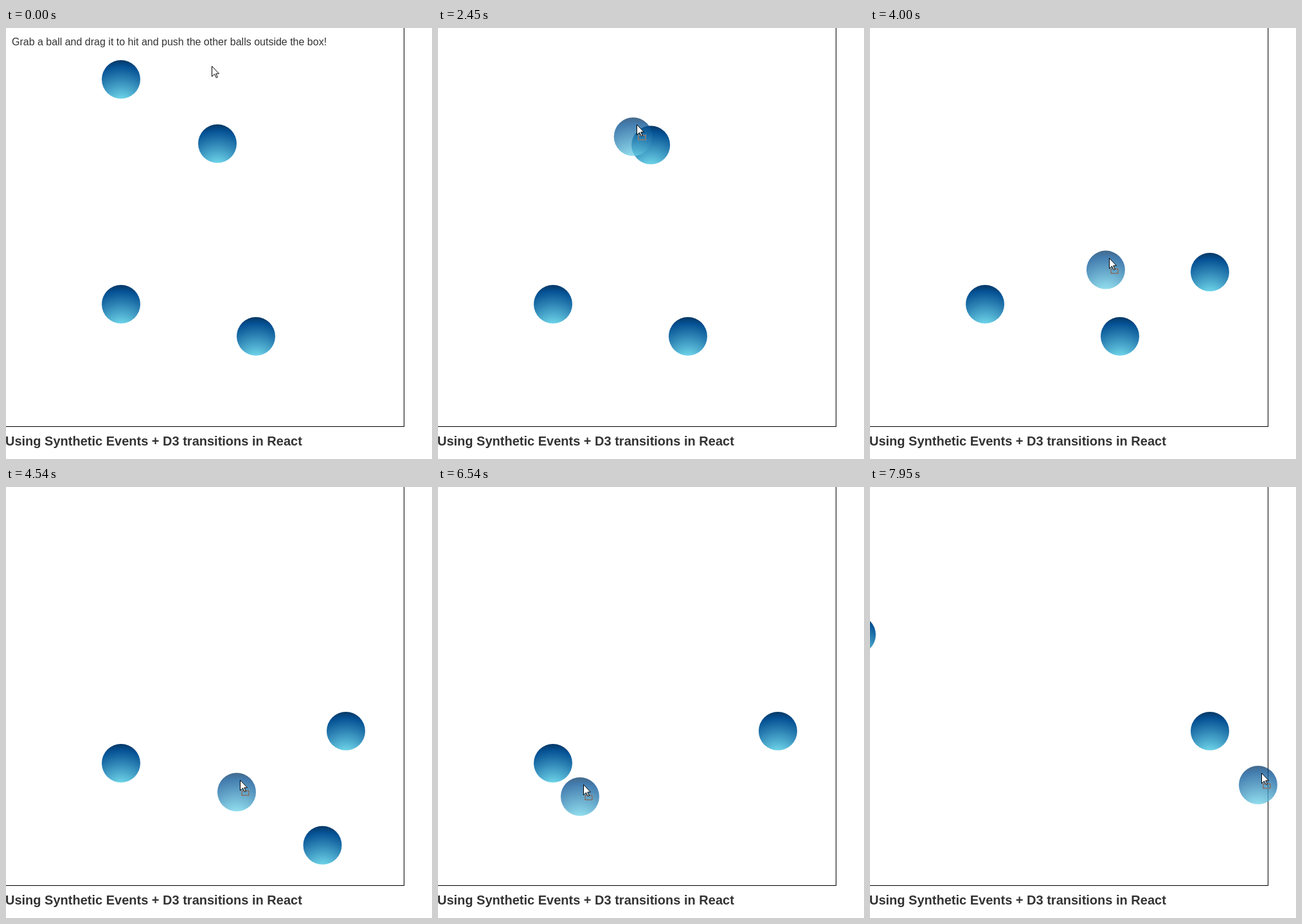
Write an HTML page with a canvas that moves like this. It is 663x671 px and loops after 8 s.

```html
<!DOCTYPE html>
<html lang="en">
<head>
<meta charset="utf-8">
<title>Push the balls</title>
<style>
html, body { margin: 0; width: 100%; height: 100%; overflow: hidden; background: #fff; }
canvas { display: block; }
</style>
</head>
<body>
<canvas id="stage" width="663" height="671"></canvas>
<script>
const c = document.getElementById('stage').getContext('2d');
const LOOP = 8000, PRESS = 480, GRAB = 1640, OUT = 4760, R = 30;

// The drag, leg by leg: start, end, x and y reached; it rests in between
const legs = [
  [220, 300, 255, 105], [300, PRESS, 179, 80],
  [GRAB, 1970, 186, 89], [1970, 2350, 280, 152], [2350, 2910, 413, 249],
  [3520, 3900, 369, 350], [3900, 4370, 359, 475],
  [5080, 5640, 257, 530], [5640, 5910, 246, 562],
  [5930, 6540, 221, 482], [6690, 7390, 517, 493], [7630, 7950, 604, 464]
];

const clamp = u => Math.max(0, Math.min(1, u));

function dragAt(t) {
  let x = 315, y = 78;
  for (const [start, end, toX, toY] of legs) {
    const k = clamp((t - start) / (end - start));
    x += (toX - x) * k;
    y += (toY - y) * k;
  }
  return [x, y];
}

// Cubic in-out push lasting 500 ms
function push(t, start) {
  const u = clamp((t - start) / 500);
  return u < 0.5 ? 4 * u ** 3 : 1 - 4 * (1 - u) ** 3;
}

const shade = c.createRadialGradient(0, 42, 0, 0, 42, 78);
shade.addColorStop(0, '#81e8f6');
shade.addColorStop(0.1, '#76deef');
shade.addColorStop(0.8, '#055194');
shade.addColorStop(1, '#062745');

function ball(x, y, alpha = 1) {
  c.save();
  c.translate(x, y);
  c.globalAlpha = alpha;
  c.fillStyle = shade;
  c.beginPath();
  c.arc(0, 0, R, 0, 2 * Math.PI);
  c.fill();
  c.restore();
}

function pushed(x, y, dx, dy, k) {
  ball(x + dx * k, y + dy * k);
}

const arrow = new Path2D('M.5 .5V16.5L4.5 12.8L7.3 18.5L9.3 17.6L6.7 12H11.5Z');

// Dithered frame shown beside the arrow while dragging
function dragMark() {
  for (let y = 16; y < 25; y++)
    for (let x = 2; x < 15; x++) {
      const inside = x > 3 && x < 13 && y > 17 && y < 23;
      if (inside) continue;
      c.fillStyle = (x + y) % 2 ? '#222' : '#ddd';
      c.fillRect(x, y, 1, 1);
    }
}

function pointer(x, y, dragging) {
  c.save();
  c.translate(Math.round(x), Math.round(y));
  if (dragging) dragMark();
  c.fillStyle = '#fff';
  c.strokeStyle = '#000';
  c.fill(arrow);
  c.stroke(arrow);
  c.restore();
}

function label(text, x, y, font) {
  c.font = font + ' "Liberation Sans", Arial, sans-serif';
  c.fillStyle = '#333';
  c.fillText(text, x, y);
}

function draw(t) {
  c.fillStyle = '#fff';
  c.fillRect(0, 0, 663, 671);
  c.strokeRect(-0.5, -0.5, 620, 621);
  label('Using Synthetic Events + D3 transitions in React', -1, 650, 'bold 20px');
  if (t < PRESS)
    label('Grab a ball and drag it to hit and push the other balls outside the box!', 9, 27, '16px');

  pushed(329, 180, 200, 200, push(t, 2380));
  pushed(179, 430, -200, -200, push(t, 6530));
  if (t < OUT) pushed(389, 480, 200, 150, push(t, 4287));

  const [x, y] = dragAt(t), dragging = t >= GRAB;
  if (dragging) ball(x, y, 0.75);
  else ball(179, 80);
  pointer(x + 5, y - 19, dragging);
}

const begin = performance.now();
function tick() {
  const t = (performance.now() - begin) % LOOP;
  draw(t - t % 10);
  requestAnimationFrame(tick);
}
tick();
</script>
</body>
</html>
```
